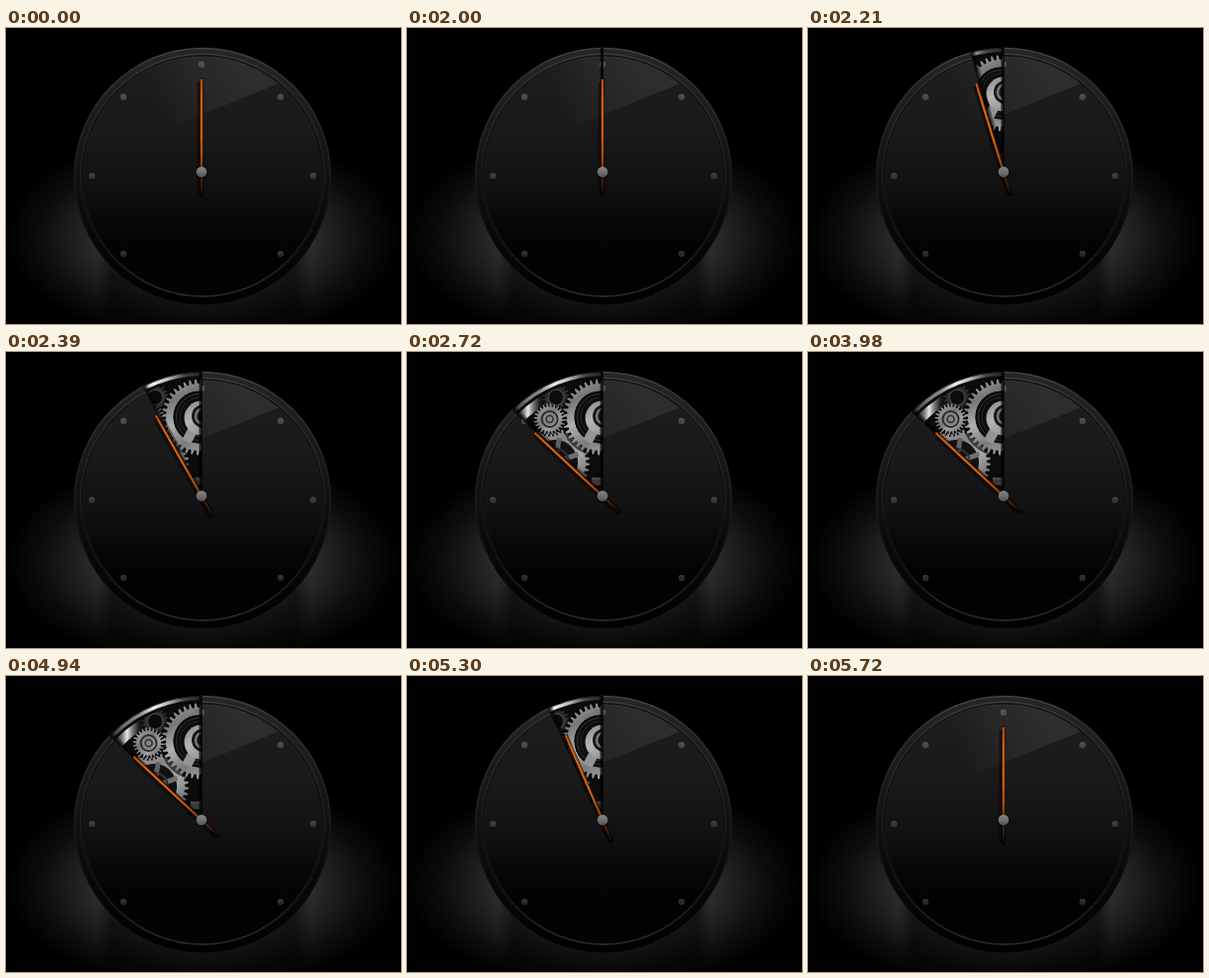
An HTML page with a canvas for the animation above (6.41 s loop, 400 px wide and 300 px high).

```html
<!DOCTYPE html>
<html lang="en">
<head>
<meta charset="utf-8">
<title>Clock</title>
<style>
html, body { margin: 0; width: 100%; height: 100%; overflow: hidden; background: #000; }
canvas { display: block; width: 400px; height: 300px; }
</style>
</head>
<body>
<canvas id="stage"></canvas>
<script>
const canvas = document.getElementById('stage');
const c = canvas.getContext('2d');
const ratio = window.devicePixelRatio || 1;
canvas.width = 400 * ratio;
canvas.height = 300 * ratio;

const LOOP = 6410, STEP = 30, OPEN = 2000, SWING = 720, CLOSED = 5720;
const CLOSE = CLOSED - SWING;
const MAX_ANGLE = 47;
const dial = { x: 199, y: 150, r: 130 };
const pivot = { x: 198, y: 146 };
const TAU = Math.PI * 2;
const rad = deg => deg * Math.PI / 180;
const clamp = v => Math.max(0, Math.min(1, v));
const ease = p => p + .35 * p * (1 - p);

function linear(x0, y0, x1, y1, stops) {
  const g = c.createLinearGradient(x0, y0, x1, y1);
  stops.forEach(([at, color]) => g.addColorStop(at, color));
  return g;
}

function radial(x, y, r, stops) {
  const g = c.createRadialGradient(x, y, 0, x, y, r);
  stops.forEach(([at, color]) => g.addColorStop(at, color));
  return g;
}

function disc(x, y, r, fill) {
  c.beginPath();
  c.arc(x, y, r, 0, TAU);
  c.fillStyle = fill;
  c.fill();
}

function ring(x, y, r, width, color, from = 0, to = TAU) {
  c.beginPath();
  c.arc(x, y, r, from, to);
  c.lineWidth = width;
  c.strokeStyle = color;
  c.stroke();
}

function line(x0, y0, x1, y1, width, color) {
  c.beginPath();
  c.moveTo(x0, y0);
  c.lineTo(x1, y1);
  c.lineWidth = width;
  c.strokeStyle = color;
  c.stroke();
}

// Toothed annulus; a hole radius of 0 gives a solid wheel.
function gear(x, y, outer, root, hole, teeth, fill, turn = 0) {
  c.beginPath();
  const pitch = TAU / teeth;
  for (let i = 0; i < teeth; i++) {
    const a = turn + i * pitch;
    [[0, root], [.18, outer], [.45, outer], [.63, root]].forEach(([k, r]) =>
      c.lineTo(x + r * Math.cos(a + k * pitch), y + r * Math.sin(a + k * pitch)));
  }
  c.closePath();
  if (hole) {
    c.moveTo(x + hole, y);
    c.arc(x, y, hole, 0, TAU, true);
  }
  c.fillStyle = fill;
  c.fill();
}

function spoke(x, y, from, to, angle, width, color) {
  const dx = Math.cos(angle), dy = Math.sin(angle);
  line(x + from * dx, y + from * dy, x + to * dx, y + to * dy, width, color);
}

function drawBackground() {
  c.fillStyle = '#000';
  c.fillRect(0, 0, 400, 300);
  c.save();
  c.translate(200, 212);
  c.scale(1, .54);
  disc(0, 0, 200, radial(0, 0, 200, [
    [0, '#363636'], [.5, '#323232'], [.66, '#1e1e1e'], [.82, '#0d0d0d'], [1, '#000']]));
  c.restore();
  c.fillStyle = linear(92, 0, 308, 0, [
    [0, 'rgba(0,0,0,0)'], [.07, 'rgba(0,0,0,.55)'], [.5, 'rgba(0,0,0,.45)'],
    [.93, 'rgba(0,0,0,.55)'], [1, 'rgba(0,0,0,0)']]);
  c.fillRect(92, 225, 216, 75);
}

function drawFace() {
  const { x, y, r } = dial;
  disc(x, y, r + .3, linear(0, 20, 0, 280, [
    [0, '#454545'], [.1, '#323232'], [.4, '#222'], [.7, '#0e0e0e'], [.9, '#030303'], [1, '#010101']]));
  ring(x, y, 126.5, 4.5, linear(0, 20, 0, 280, [
    [0, '#262626'], [.4, '#151515'], [.7, '#080808'], [1, '#010101']]));
  ring(x, y, 122, 2, linear(0, 28, 0, 272, [
    [0, '#151515'], [.5, '#0f0f0f'], [.8, '#131313'], [1, '#262626']]));
  disc(x, y, 120.8, linear(0, 28, 0, 272, [
    [0, '#1d1d1d'], [.3, '#1a1a1a'], [.52, '#121212'], [.7, '#070707'],
    [.82, '#020202'], [1, '#030303']]));

  c.save();
  c.beginPath();
  c.arc(x, y, 121, 0, TAU);
  c.clip();
  c.beginPath();
  [[155, 105], [277, 56], [250, 20], [120, 20]].forEach(p => c.lineTo(...p));
  c.closePath();
  c.fillStyle = linear(160, 92, 245, 55, [
    [0, 'rgba(255,255,255,0)'], [.45, 'rgba(255,255,255,.045)'], [1, 'rgba(255,255,255,.075)']]);
  c.fill();
  c.restore();

  [[198, 37], [278, 70], [311, 150], [278, 229], [119, 229], [87, 150], [119, 70]]
    .forEach(([dx, dy]) => {
      const top = Math.round(90 - (dy - 37) * .2), low = top - 18;
      disc(dx, dy, 3.2, linear(0, dy - 3, 0, dy + 3, [
        [0, `rgb(${top},${top},${top})`], [1, `rgb(${low},${low},${low})`]]));
    });
}

function drawWorks(t) {
  c.fillStyle = '#0b0b0b';
  c.fillRect(60, 15, 145, 140);

  const turn = clamp((t - OPEN) / (CLOSE - OPEN)) * Math.PI;
  gear(151, 46, 14, 11, 7, 18, '#2c2c2c', turn);
  ring(151, 46, 8, 1, '#484848');
  gear(163, 92, 12, 9, 4, 16, '#222', -turn);

  // Lower wheel
  gear(151, 114, 35, 31.5, 24, 36, '#050505');
  gear(150, 112, 35, 31, 23, 36, linear(138, 80, 186, 132, [
    [0, '#959595'], [.3, '#858585'], [.6, '#a8a8a8'], [1, '#5a5a5a']]));
  disc(150, 112, 22.5, '#121212');
  spoke(150, 112, 5, 25, -.35, 5, '#707070');
  spoke(150, 112, 5, 25, -1.4, 5, '#606060');
  ring(150, 112, 14, 2, '#333');

  // Main wheel
  disc(195, 67, 39, 'rgba(0,0,0,.6)');
  gear(196, 66, 38.5, 34, 26.5, 40, linear(160, 30, 200, 106, [
    [0, '#aaa'], [.25, '#777'], [.5, '#b0b0b0'], [.75, '#7c7c7c'], [1, '#a2a2a2']]));
  disc(196, 66, 26.5, '#0c0c0c');
  ring(196, 66, 23.5, 1, '#343434');
  ring(196, 66, 20, 1, '#292929');
  spoke(196, 66, 12, 28, rad(118), 10, '#949494');
  disc(198, 67, 17.5, linear(180, 50, 200, 86, [
    [0, '#8a8a8a'], [.5, '#b5b5b5'], [1, '#8e8e8e']]));
  disc(200, 65, 12, '#161616');
  ring(200, 65, 8, 2.5, '#777');

  // Small wheel
  gear(145, 69, 17, 14, 0, 24, '#040404');
  gear(144.5, 68, 16, 12.5, 0, 24, linear(132, 55, 158, 81, [
    [0, '#a5a5a5'], [.4, '#777'], [.65, '#a0a0a0'], [1, '#606060']]));
  ring(144.5, 68, 8, 2, '#2c2c2c');
  disc(144.5, 68, 6.5, '#858585');
  ring(144.5, 68, 3.5, 1.5, '#2c2c2c');

  c.fillStyle = '#3b3b3b';
  c.fillRect(187, 128, 11, 7);
  line(187, 128, 198, 128, 1, '#666');

  // Polished case edge
  ring(dial.x, dial.y, 119, 11, linear(110, 0, 140, 0, [
    [0, '#1c1c1c'], [.25, '#777'], [.42, '#e6e6e6'], [.6, '#777'],
    [.8, '#222'], [1, 'rgba(12,12,12,0)']]), rad(215), rad(240));
  ring(dial.x, dial.y, 125.5, 5, '#0a0a0a');
  ring(dial.x, dial.y, 127.5, 3.4, linear(108, 0, 198, 0, [
    [0, '#333'], [.15, '#777'], [.3, '#888'], [.46, '#eee'],
    [.62, '#bbb'], [.8, '#444'], [1, '#222']]));
}

function drawOpening(angle, t) {
  const a = rad(angle);
  const far = 180;
  const ex = pivot.x - far * Math.sin(a), ey = pivot.y - far * Math.cos(a);
  c.save();
  c.beginPath();
  c.arc(dial.x, dial.y, dial.r, 0, TAU);
  c.clip();
  line(pivot.x, pivot.y, ex, ey, 3, 'rgba(0,0,0,.7)');
  c.beginPath();
  c.moveTo(pivot.x, pivot.y);
  c.lineTo(ex, ey);
  c.lineTo(pivot.x, pivot.y - far);
  c.closePath();
  c.clip();
  drawWorks(t);
  line(pivot.x, pivot.y, ex, ey, 7, 'rgba(0,0,0,.4)');
  line(pivot.x, pivot.y, ex, ey, 3, 'rgba(0,0,0,.6)');
  line(pivot.x - 1, 10, pivot.x - 1, pivot.y, 3, 'rgba(0,0,0,.7)');
  c.restore();
  line(pivot.x + .2, 20, pivot.x + .2, pivot.y, 1, '#000');
}

function drawHand(angle) {
  c.save();
  c.translate(pivot.x, pivot.y);
  c.rotate(-rad(angle));
  line(-2.5, -91, -2.5, 23, 4, 'rgba(0,0,0,.45)');
  line(0, -94.5, 0, 25, 4.2, 'rgba(0,0,0,.75)');
  c.fillStyle = linear(0, -94, 0, 24, [
    [0, '#b95008'], [.15, '#dd6811'], [.5, '#d9640e'], [.7, '#a04306'],
    [.82, '#5c2804'], [.94, '#281307'], [1, '#080604']]);
  c.fillRect(-1.2, -94, 2.4, 118);
  line(.8, -92, .8, -24, .6, 'rgba(90,30,0,.5)');
  c.restore();

  disc(pivot.x, pivot.y + .8, 6, 'rgba(0,0,0,.6)');
  disc(pivot.x, pivot.y, 5.4, linear(0, 141, 0, 152, [
    [0, '#858585'], [.5, '#6d6d6d'], [1, '#4d4d4d']]));
}

function angleAt(t) {
  const opened = ease(clamp((t - OPEN) / SWING));
  const closed = ease(clamp((t - CLOSE) / SWING));
  return MAX_ANGLE * (opened - closed);
}

function draw(time) {
  const now = time % LOOP;
  const t = now < OPEN ? 0 : OPEN + Math.floor((now - OPEN) / STEP) * STEP;
  c.setTransform(ratio, 0, 0, ratio, 0, 0);
  drawBackground();
  drawFace();
  // The cover trails the hand by one step.
  if (t >= OPEN && t < CLOSED) drawOpening(Math.max(angleAt(t - STEP), .4), t);
  drawHand(angleAt(t));
}

const start = performance.now();
function tick() {
  draw(performance.now() - start);
  requestAnimationFrame(tick);
}
tick();
</script>
</body>
</html>
```
